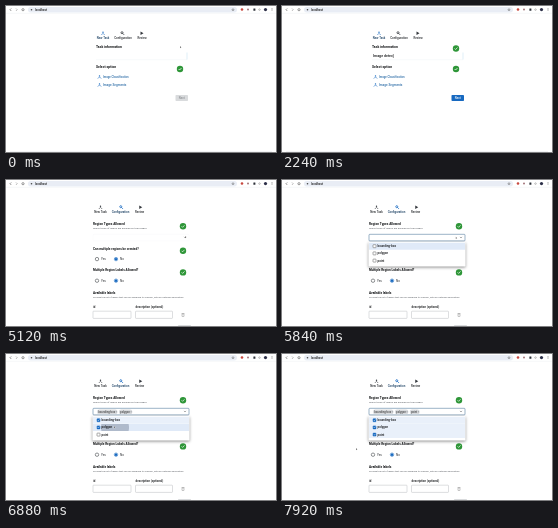
Animation, 270 px wide and 146 px high, one loop 8000 ms. Source, as an HTML page with a canvas:

```html
<!DOCTYPE html>
<html lang="en">
<head>
<meta charset="utf-8">
<title>Task setup form</title>
<style>
  html, body { margin: 0; width: 100%; height: 100%; overflow: hidden; background: #fff; }
  canvas { display: block; width: 270px; height: 146px; }
</style>
</head>
<body>
<canvas id="stage"></canvas>
<script>
const W = 270, H = 146, LOOP = 8000, STEP = 80;
const BLUE = '#1769c0', GREEN = '#2e9638', DARK = '#0d0f11', GREY = '#4c5056', PALE = '#e9f0fa';
const FONT = 'Roboto, "Open Sans", sans-serif';
const canvas = document.getElementById('stage');
const c = canvas.getContext('2d');
const scale = window.devicePixelRatio || 1;
canvas.width = W * scale;
canvas.height = H * scale;

const NAME = 'Image detector';
const KEY_TIMES = [160, 240, 320, 400, 480, 560, 1120, 1360, 1760, 2000, 2240, 2480, 2720, 2880];
const OPTIONS = ['bounding-box', 'polygon', 'point'];
const PICK_TIMES = [6400, 6880, 7440];
const OPEN_AT = 5760, PAGE_AT = 4800;

// pointer stops: time, x, y
const PATH = [
  [0, 174, 41], [3040, 174, 43], [3760, 107, 78], [4400, 109, 79],
  [4720, 175, 92], [4880, 175, 92], [5120, 179, 57], [5760, 179, 57],
  [6240, 109, 67], [6480, 109, 67], [6800, 108, 73], [7280, 108, 74],
  [7440, 106, 80], [7520, 106, 80], [7840, 74, 95], [8000, 74, 95]
];

function text(s, x, y, size, color = DARK, weight = 400, align = 'left') {
  c.font = `${weight} ${size}px ${FONT}`;
  c.fillStyle = color;
  c.textAlign = align;
  c.textBaseline = 'middle';
  c.fillText(s, x, y);
  return c.measureText(s).width;
}

function box(x, y, w, h, r, fill, stroke, line = 0.4) {
  c.beginPath();
  c.roundRect(x, y, w, h, r);
  if (fill) { c.fillStyle = fill; c.fill(); }
  if (stroke) { c.strokeStyle = stroke; c.lineWidth = line; c.stroke(); }
}

function dot(x, y, r, fill) {
  c.beginPath();
  c.arc(x, y, r, 0, Math.PI * 2);
  c.fillStyle = fill;
  c.fill();
}

function ring(x, y, r, color, line) {
  c.beginPath();
  c.arc(x, y, r, 0, Math.PI * 2);
  c.strokeStyle = color;
  c.lineWidth = line;
  c.stroke();
}

function lines(color, width, ...pts) {
  c.beginPath();
  pts.forEach(([x, y], i) => i ? c.lineTo(x, y) : c.moveTo(x, y));
  c.strokeStyle = color;
  c.lineWidth = width;
  c.stroke();
}

function okBadge(x, y) {
  dot(x, y, 3.2, GREEN);
  lines('#fff', 0.7, [x - 1.4, y], [x - 0.4, y + 1], [x + 1.5, y - 1]);
}

function toolbar() {
  lines('#444', 0.6, [5.2, 2.5], [4, 3.7], [5.2, 4.9]);
  lines('#888', 0.6, [10, 2.5], [11.2, 3.7], [10, 4.9]);
  ring(17, 3.7, 1.1, '#555', 0.6);
  box(22, 1, 209, 5.4, 2.7, '#e9edf5');
  dot(25.5, 3.7, 0.8, '#444');
  text('localhost', 29, 3.8, 2.9, '#111', 500);
  ring(227, 3.7, 0.9, '#555', 0.5);
  dot(236, 3.5, 1.3, '#c8483f');
  dot(242, 3.6, 1, '#a3757a');
  box(247.4, 2.5, 2, 2.2, 0.3, '#2c3038');
  ring(253.5, 3.6, 0.8, '#888', 0.5);
  dot(259.5, 3.6, 1.6, '#2c2f48');
  [2.5, 3.6, 4.7].forEach(y => dot(266, y, 0.4, '#444'));
  lines('#eceef1', 0.5, [0, 7.3], [W, 7.3]);
}

function personIcon(x, y, color) {
  dot(x, y - 1.1, 0.7, color);
  lines(color, 0.6, [x - 1.7, y + 1.6], [x, y - 0.1], [x + 1.7, y + 1.6]);
}

function tabs(page) {
  const tint = i => i === page ? BLUE : '#33373c';
  const shift = page ? -2.5 : 0;
  personIcon(97 + shift, 27.4, tint(0));
  ring(116 + shift / 2, 26.7, 1, tint(1), 0.8);
  lines(tint(1), 0.8, [116.7 + shift / 2, 27.4], [118.2 + shift / 2, 28.9]);
  c.beginPath();
  c.moveTo(134.5 + shift / 2, 25.5);
  c.lineTo(137.5 + shift / 2, 27.2);
  c.lineTo(134.5 + shift / 2, 28.9);
  c.fillStyle = tint(2);
  c.fill();
  ['New Task', 'Configuration', 'Review'].forEach((s, i) =>
    text(s, [97, 117, 136][i] + shift, 32.2, 2.9, i === page ? '#163c60' : '#25282c', 500, 'center'));
}

function button(x, y, on) {
  box(x, y, 12.5, 6, 0.8, on ? BLUE : '#d9dbdd');
  text('Next', x + 6.2, y + 3.1, 2.8, on ? '#fff' : '#8b8e92', 500, 'center');
}

function firstPage(t) {
  const typed = KEY_TIMES.filter(k => k <= t).length;
  const ready = t >= 240;
  tabs(0);
  text('Task information', 90, 40.6, 3.4, DARK, 600);
  lines('#eef4f8', 0.4, [90, 53.7], [181, 53.7]);
  lines('#c9e4f4', 0.6, [181, 46.5], [181, 53.5]);
  const w = text(NAME.slice(0, typed), 91, 50, 3.6, DARK, 500);
  const caret = t > 0 && t < 3400 && (t % 1040 < 560 || Math.abs(t - 2240) < 160);
  if (caret) lines('#222', 0.5, [91.4 + w, 48], [91.4 + w, 52]);
  if (ready) okBadge(174, 42.5);

  text('Select option', 90, 61.2, 3.4, DARK, 600);
  okBadge(174, 63);
  if (t >= 3760 && t < 4560) {
    box(90, 75.5, 35, 7, 1, '#edf5fc');
    box(102, 75.5, 10, 7, 3, '#cfe5f7');
  }
  ['Image Classification', 'Image Segments'].forEach((s, i) => {
    personIcon(93.5, 71 + i * 8, BLUE);
    text(s, 97, 71.2 + i * 8, i ? 3.1 : 2.8, '#2a6ba6', 500);
  });
  button(169.5, 89, ready);
  lines('#e3e5e8', 0.5, [4, 145.5], [W - 4, 145.5]);
}

function question(s, y) {
  text(s, 87, y, 3.1, DARK, 700);
  okBadge(177, y + 2);
  [['Yes', 91, false], ['No', 110, true]].forEach(([label, x, on]) => {
    const color = on ? BLUE : '#44484c';
    ring(x, y + 10.3, 1.7, color, 0.6);
    if (on) dot(x, y + 10.3, 1.2, color);
    text(label, x + 4, y + 10.4, 3, '#25282c');
  });
}

// click wave spreading inside one option row
function ripple(x, y, age) {
  if (age < 0 || age > 240) return;
  c.save();
  c.beginPath();
  c.rect(87, y - 3.5, 96, 7);
  c.clip();
  dot(x, y, 14 + age * 0.1, `rgba(70,85,110,${0.32 * (1 - age / 480)})`);
  c.restore();
}

function dropdown(t, picked) {
  c.save();
  c.shadowColor = 'rgba(0,0,0,.45)';
  c.shadowBlur = 3 * scale;
  c.shadowOffsetY = scale;
  box(86.5, 62, 97, 24.5, 0.8, '#fff');
  c.restore();
  const hover = t < 6720 ? 0 : t < 7360 ? 1 : t < 7680 ? 2 : -1;
  OPTIONS.forEach((s, i) => {
    const y = 66.2 + i * 7.2, on = i < picked;
    if (on || i === hover) box(87, y - 3.5, 96, 7, 0, i === hover ? '#e0eaf8' : PALE);
    ripple(109, y, t - PICK_TIMES[i]);
    box(91, y - 1.5, 3, 3, 0.5, on ? BLUE : '#fff', on ? BLUE : '#555', 0.5);
    if (on) lines('#fff', 0.5, [91.7, y], [92.3, y + 0.6], [93.4, y - 0.7]);
    text(s, 95.5, y + 0.1, 3, DARK, 500);
  });
}

function secondPage(t) {
  const open = t >= OPEN_AT;
  const picked = PICK_TIMES.filter(k => k <= t).length;
  tabs(1);
  text('Region Types Allowed', 87, 44.2, 3.2, DARK, 700);
  text('Which types of region are allowed on the image?', 87, 48.5, 2.5, GREY);
  okBadge(177, 46.3);
  box(87, 54.3, 96, 6.6, 0.8, '#fff', open ? '#37648c' : '#f3f4f6', open ? 0.5 : 0.3);
  lines('#444', 0.5, [178, 56.9], [179, 57.9], [180, 56.9]);
  let x = 91;
  OPTIONS.slice(0, picked).forEach(s => {
    c.font = `400 2.8px ${FONT}`;
    const w = c.measureText(s).width + 3.6;
    box(x, 55.4, w, 4.8, 2.3, '#d9dbde');
    text(s, x + 1.2, 57.9, 2.8, '#222');
    dot(x + w - 1.3, 57.8, 0.6, '#8b8e92');
    x += w + 1.4;
  });

  question('Can multiple regions be created?', 68.8);
  question('Multiple Region Labels Allowed?', 90.4);

  text('Available labels', 87, 112.6, 3.2, DARK, 600);
  text('Provide the list of labels that can be assigned to a region, with an optional description.', 87, 117.2, 2.4, GREY);
  text('id', 87, 127.3, 2.8, DARK, 500);
  text('description (optional)', 129.5, 127.3, 2.9, DARK, 500);
  box(87, 131.2, 38, 7.2, 0.6, '#fff', '#a9adb2');
  box(129.5, 131.2, 37, 7.2, 0.6, '#fff', '#a9adb2');
  box(176, 134, 2, 2.5, 0.3, null, '#888', 0.5);
  lines('#888', 0.5, [175.5, 133.5], [178.5, 133.5]);
  box(172, 145, 13, 4, 0.8, '#d9dbdd');
  if (open) dropdown(t, picked);
}

function pointer(t) {
  if (t >= 160 && t < 3040) return;
  const i = PATH.findIndex(p => p[0] > t);
  const [t0, x0, y0] = PATH[i - 1], [t1, x1, y1] = PATH[i];
  const u = (t - t0) / (t1 - t0), e = u * u * (3 - 2 * u);
  c.save();
  c.translate(x0 + (x1 - x0) * e, y0 + (y1 - y0) * e);
  c.beginPath();
  c.moveTo(0, -1);
  c.lineTo(0, 1.2);
  c.lineTo(0.5, 0.7);
  c.lineTo(1.4, 0.6);
  c.closePath();
  c.strokeStyle = '#fff';
  c.lineWidth = 0.4;
  c.stroke();
  c.fillStyle = '#666';
  c.fill();
  c.restore();
}

function draw(now) {
  const t = Math.floor((now % LOOP) / STEP) * STEP;
  c.setTransform(scale, 0, 0, scale, 0, 0);
  c.fillStyle = '#fff';
  c.fillRect(0, 0, W, H);
  toolbar();
  if (t < PAGE_AT) firstPage(t); else secondPage(t);
  pointer(t);
}

const start = performance.now();
function tick() {
  draw(performance.now() - start);
  requestAnimationFrame(tick);
}
tick();
</script>
</body>
</html>
```
